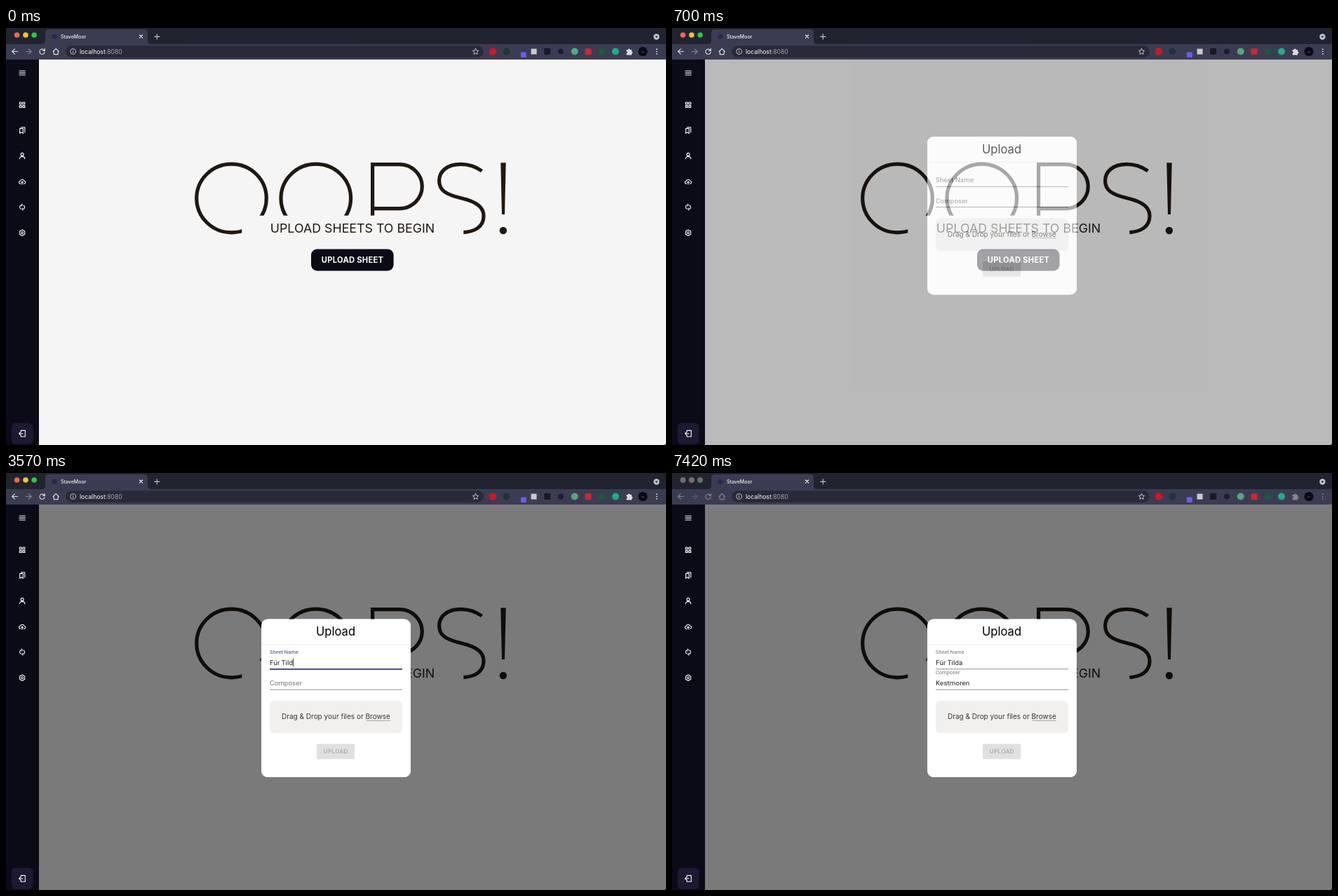
These frames come from a looping animation (941x595 px, 8000 ms). An HTML page:

```html
<!DOCTYPE html>
<html lang="en">
<head>
<meta charset="utf-8">
<title>StaveMoor</title>
<style>
html, body { margin: 0; width: 100%; height: 100%; overflow: hidden; background: #f5f5f5; }
svg { display: block; width: 100%; height: 100%; }
text { font-family: Inter, "Open Sans", sans-serif; white-space: pre; }
.line { fill: none; stroke: #fff; stroke-width: 1.1; stroke-linecap: round; stroke-linejoin: round; }
.mid { text-anchor: middle; }
.letters { fill: none; stroke: #1f1813; stroke-width: 5.2; }
.field text { font-family: Roboto, "Noto Sans", sans-serif; font-size: 9.8px; letter-spacing: .09px; }
.value { fill: #212121; }
</style>
</head>
<body>
<svg viewBox="0 0 941 595">
  <defs>
    <clipPath id="page"><path d="M47 45H941V595H47z"/></clipPath>
  </defs>

  <!-- page -->
  <rect width="941" height="595" fill="#f5f5f5"/>
  <g class="letters">
    <ellipse cx="321.5" cy="243" rx="49.8" ry="48.8"/>
    <ellipse cx="441.8" cy="243" rx="49.8" ry="48.8"/>
    <path d="M522.6 290V194.6H561A32.3 31.5 0 0 1 561 257.6H522.6"/>
    <path d="M678.5 204C669 197.3 659 194.4 648.5 194.4C629 194.4 617.6 204.5 617.6 218C617.6 231.5 627 237.5 649 242.8C672 248.3 681 256 681 268.5C681 283 669 291.6 649 291.6"/>
  </g>
  <path d="M705.3 192.3H712.7L711 266H707z" fill="#1f1813"/>
  <circle cx="708.9" cy="289" r="5.2" fill="#1f1813"/>
  <rect x="336.3" y="267.6" width="316" height="34" fill="#f5f5f5"/>
  <text class="mid" x="494" y="291.8" font-size="17.8" fill="#1f1813">UPLOAD SHEETS TO BEGIN</text>
  <rect x="435" y="315.6" width="117.6" height="31" rx="8.5" fill="#0b0b18"/>
  <text class="mid" x="494" y="334.8" font-size="11.2" font-weight="700" letter-spacing=".25" fill="#fff">UPLOAD SHEET</text>

  <!-- dialog -->
  <g clip-path="url(#page)">
    <g id="dialog">
      <path id="shade" fill-rule="evenodd" d="M-60-600H1200V1200H-60zM373 208.6H568A9 9 0 0 1 577 217.6V425A9 9 0 0 1 568 434H373A9 9 0 0 1 364 425V217.6A9 9 0 0 1 373 208.6z"/>
      <rect x="364" y="208.6" width="213" height="225.4" rx="9" fill="#fff"/>
      <text class="mid" x="470" y="232" font-size="16.6">Upload</text>
      <rect x="364" y="244.6" width="213" height=".8" fill="#e4e4e4"/>
      <g class="field" id="sheet"></g>
      <g class="field" id="composer" transform="translate(0 29.3)"></g>
      <rect x="376" y="325" width="189" height="46.2" rx="5.5" fill="#f1f0ef"/>
      <text class="mid" x="470.4" y="351.2" font-size="10" fill="#363636">Drag &amp; Drop your files or Browse</text>
      <rect x="513.5" y="352.8" width="34.5" height=".8" fill="#8c8c8c"/>
      <rect x="443" y="386.5" width="54.2" height="21.8" rx="2.6" fill="#e0e0e0"/>
      <text class="mid" x="470.2" y="400.4" font-size="8.2" font-weight="500" letter-spacing=".3" fill="#a6a6a6">UPLOAD</text>
    </g>
  </g>

  <!-- sidebar -->
  <path d="M0 45H47V595H0z" fill="#0b0b18"/>
  <rect x="8" y="563.4" width="30.6" height="30.6" rx="6" fill="#1d1931"/>
  <g class="line">
    <path d="M19 61.2h8.4M19 64.1h8.4M19 67h8.4"/>
    <path d="M19.4 106h2.8v2.8h-2.8zM24 106h2.8v2.8h-2.8zM19.4 110.6h2.8v2.8h-2.8zM24 110.6h2.8v2.8h-2.8z"/>
    <path d="M19.7 143.4h4.6v7l-2.3-1.8l-2.3 1.8zM21.6 141.8h5.2v7.2"/>
    <circle cx="23.1" cy="180.4" r="2"/>
    <path d="M19.4 186.6a3.7 3.2 0 0 1 7.4 0"/>
    <path d="M21 222.2h-.3a2 2 0 0 1-.3-4a2.9 2.9 0 0 1 5.5 0a2 2 0 0 1-.2 4h-.4M23.1 223v-3.6M21.7 220.4l1.4-1.3l1.4 1.3"/>
    <path d="M21.2 258.1a3.1 3.1 0 0 1 0-5.4M25 253a3.1 3.1 0 0 1 0 5.4M22.2 251.2l1.2 1.3l-1.2 1.3M24 257.2l-1.2 1.3l1.2 1.3"/>
    <path d="M23.1 288l3.6 2.1v4.2l-3.6 2.1l-3.6-2.1v-4.2z"/>
    <circle cx="23.1" cy="292.2" r="1.4"/>
    <path d="M21.2 576.6v-2.2h6.2v8.6h-6.2v-2.2M18.6 578.7h5.4M20.4 577l-1.8 1.7l1.8 1.7"/>
  </g>

  <!-- browser frame -->
  <path d="M0 0H941V24H0z" fill="#20242f"/>
  <path d="M0 23H941V45H0z" fill="#3a3d52"/>
  <path d="M51 23q5 0 5-5V7q0-5 5-5H197q5 0 5 5V18q0 5 5 5z" fill="#3a3d52"/>
  <rect x="85" y="25.2" width="596" height="16.8" rx="8.4" fill="#282a38"/>
  <g id="lights">
    <circle cx="15.6" cy="10" r="3.8" fill="#ff5f57"/>
    <circle cx="28" cy="10" r="3.8" fill="#febc2e"/>
    <circle cx="40.2" cy="10" r="3.8" fill="#28c840"/>
  </g>
  <g id="greyLights" fill="#6a6c76">
    <circle cx="15.6" cy="10" r="3.8"/><circle cx="28" cy="10" r="3.8"/><circle cx="40.2" cy="10" r="3.8"/>
  </g>
  <circle cx="69" cy="12.2" r="3.6" fill="#2a2750"/>
  <text x="78" y="14.7" font-size="7" font-weight="500" fill="#f1f1f4">StaveMoor</text>
  <path class="line" d="M190.4 10l4.2 4.2M194.6 10l-4.2 4.2"/>
  <path class="line" style="stroke:#c4c6ce" d="M211.8 12.4h7M215.3 8.9v7"/>
  <circle cx="927.4" cy="12.5" r="4.2" fill="#c4c6ce"/>
  <path d="M925.2 11.4h4.4l-2.2 2.9z" fill="#20242f"/>

  <g id="tools">
    <g class="line" style="stroke:#dcdde3">
      <path d="M16.6 33.5h-7.8M12.4 29.8l-3.7 3.7l3.7 3.7"/>
      <path d="M28.2 33.5h7.8M32.4 29.8l3.7 3.7l-3.7 3.7" stroke-opacity=".45"/>
      <path d="M54.9 32A3.7 3.7 0 1 0 55.3 34.4M55.3 29.6v2.8h-2.8"/>
      <path d="M67 33.6l4.2-4.1l4.2 4.1M68.2 33v4.6h6V33"/>
    </g>
    <path d="M884.6 31h2.2a1.5 1.5 0 0 1 3 0h2.2v2.4a1.5 1.5 0 0 1 0 3v2h-7.4v-2.2a1.4 1.4 0 0 0 0-2.8z" fill="#dcdde3"/>
    <g fill="#dcdde3">
      <circle cx="927.8" cy="30.3" r=".95"/><circle cx="927.8" cy="33.6" r=".95"/><circle cx="927.8" cy="36.9" r=".95"/>
    </g>
  </g>

  <g class="line" style="stroke:#d2d3da;stroke-width:.9">
    <circle cx="95.6" cy="33.5" r="3.9"/>
    <path d="M95.6 33.2v2.2M95.6 31.4v.1"/>
    <path d="M669.5 29.4l1.25 2.7l2.95.35l-2.2 2l.6 2.95l-2.6-1.5l-2.6 1.5l.6-2.95l-2.2-2l2.95-.35z"/>
  </g>
  <text x="105" y="36.7" font-size="8.6" fill="#a3a5af"><tspan fill="#fff">localhost</tspan>:8080</text>

  <!-- extension buttons -->
  <circle cx="694" cy="33.5" r="5.2" fill="#d9131c"/>
  <circle cx="713.5" cy="33.5" r="5" fill="#1d3340"/>
  <rect x="734" y="34.6" width="7.8" height="7.4" rx="1" fill="#675cf5"/>
  <rect x="748.6" y="29.6" width="8" height="8" fill="#c9cacd"/>
  <rect x="767.2" y="29" width="9" height="9" fill="#191a20"/>
  <circle cx="791" cy="33.5" r="4" fill="#1b1d2e"/>
  <circle cx="810.8" cy="33.5" r="5" fill="#55a87b"/>
  <rect x="825.6" y="29.2" width="9" height="9" rx="1.5" fill="#d8232f"/>
  <rect x="845.4" y="30" width="8" height="7.4" fill="#175f36"/>
  <circle cx="869" cy="33.5" r="5" fill="#14b287"/>
  <circle cx="908" cy="33.5" r="6.6" fill="#0a0a18"/>
  <path d="M906.6 34.2h2.8" stroke="#7d7d8c" stroke-width=".8"/>
  <path d="M941 591.5V595H937.5A3.5 3.5 0 0 0 941 591.5z" fill="#26272c"/>
</svg>

<script>
const LOOP = 8000, TICK = 70, OPEN = 560, SHIFT = 200;
const HOVER_IN = 1190, HOVER_OUT = 6770, WINDOW_BLUR = 7220;

// dialog entry, keyed one tick apart
const FADE = [.04, .26, .62, .87, .97, 1];
const LIFT = [122, 97, 53.5, 14.5, 3, 0];
const DIM = [.01, .078, .245, .4, .465, .492, .5];

const $ = id => document.getElementById(id);
const clamp = v => Math.min(1, Math.max(0, v));
const ease = (t, start) => 1 - (1 - clamp((t - start) / SHIFT)) ** 3;
const hold = (list, i) => list[Math.min(i, list.length - 1)];
const mix = (a, b, p) => a + (b - a) * p;

function makeField(id, label, text, focus, blur, keys) {
  const root = $(id);
  root.innerHTML = `
    <rect x="376" y="279.4" width="189" height=".8" fill="#000" fill-opacity=".55"/>
    <rect class="hover" x="376" y="279" width="189" height="1.4" fill="#161616"/>
    <rect class="active" y="279" height="1.4" fill="#303889"/>
    <text class="label">${label}</text>
    <text class="value" x="376" y="273.8"></text>
    <rect class="caret" y="264.4" width=".8" height="11.6" fill="#111"/>`;
  const part = name => root.querySelector('.' + name);
  const [hover, active, tag, value, caret] =
    ['hover', 'active', 'label', 'value', 'caret'].map(part);

  return (t, hovered) => {
    const up = ease(t, focus);
    const lit = up - ease(t, blur);
    hover.setAttribute('opacity', hovered);

    const width = 189 * lit;
    active.setAttribute('x', 470.5 - width / 2);
    active.setAttribute('width', width);

    tag.setAttribute('transform',
      `translate(376 ${mix(273.8, 258, up)}) scale(${mix(1, .75, up)})`);
    tag.setAttribute('fill',
      `rgb(${mix(117, 57, lit)},${mix(117, 70, lit)},${mix(117, 168, lit)})`);

    const typed = keys.filter(k => k <= t);
    value.textContent = text.slice(0, typed.length);

    // the blink restarts on every key
    const since = t - Math.max(focus, ...typed);
    const shown = t >= focus && t < blur && Math.floor(since / 500) % 2 === 0;
    caret.setAttribute('visibility', shown ? 'visible' : 'hidden');
    caret.setAttribute('x', 376 + (typed.length ? value.getComputedTextLength() : 0));
  };
}

const drawSheet = makeField('sheet', 'Sheet Name', 'Für Tilda', 1405, 3985,
  [2310, 2590, 2800, 2940, 3080, 3220, 3360, 3570, 3780]);
const drawComposer = makeField('composer', 'Composer', 'Kestmoren', 3985, 6990,
  [4760, 5040, 5180, 5320, 5460, 5600, 5740, 5740, 5880]);

function draw(t) {
  const step = Math.floor((t - OPEN) / TICK);
  const open = step >= 0;
  $('dialog').setAttribute('visibility', open ? 'visible' : 'hidden');
  if (open) {
    const fade = hold(FADE, step);
    $('dialog').setAttribute('opacity', fade);
    $('dialog').setAttribute('transform', `translate(0 ${-hold(LIFT, step)})`);
    $('shade').setAttribute('fill-opacity', hold(DIM, step) / fade);
  }
  drawSheet(t, ease(t, HOVER_IN) - ease(t, HOVER_OUT));
  drawComposer(t, 0);

  const away = ease(t, WINDOW_BLUR);
  $('greyLights').setAttribute('opacity', away);
  $('tools').setAttribute('opacity', 1 - .55 * away);
}

const start = performance.now();
function loop() {
  const t = (performance.now() - start) % LOOP;
  draw(Math.floor(t / TICK) * TICK);
  requestAnimationFrame(loop);
}
loop();
</script>
</body>
</html>
```
